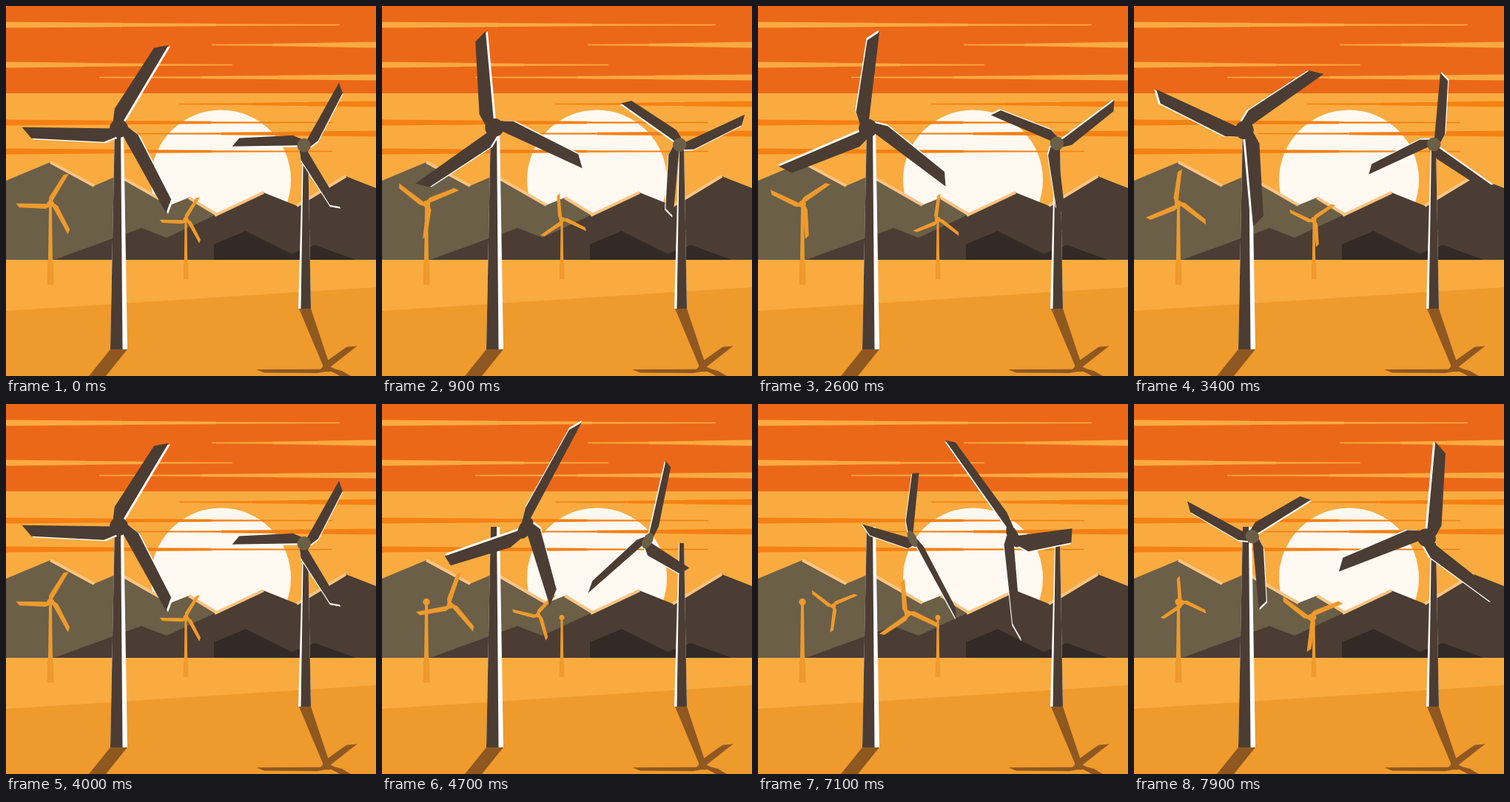
Write an HTML page with a canvas that moves like this. It is 500x500 px and loops after 8 s.

```html
<!DOCTYPE html>
<html>
<head>
<meta charset="utf-8">
<style>
html, body { margin: 0; width: 100%; height: 100%; overflow: hidden; }
canvas { display: block; }
</style>
</head>
<body>
<canvas id="stage" width="500" height="500"></canvas>
<script>
const ctx = document.getElementById('stage').getContext('2d');
const AMBER = '#f9ab40', GOLD = '#ee9a2c', RED = '#ec6819', ORANGE = '#f58013',
  OLIVE = '#6b5f48', DARK = '#4b3d33', BLACK = '#332a25', PALE = '#fcc482',
  SHADE = '#8f5820', WHITE = '#fff';
const RAD = Math.PI / 180, STEP = 100, FRAMES = 80, TAKEOFF = 40, HORIZON = 343;

function poly(color, ...p) {
  ctx.fillStyle = color;
  ctx.beginPath();
  for (let i = 0; i < p.length; i += 2) ctx.lineTo(p[i], p[i + 1]);
  ctx.fill();
}

function disc(color, x, y, r) {
  ctx.fillStyle = color;
  ctx.beginPath();
  ctx.arc(x, y, r, 0, 7);
  ctx.fill();
}

// Upright or leaning post: left and right edge at the top and at the bottom
function post(color, y0, l0, r0, y1, l1, r1) {
  poly(color, l0, y0, r0, y0, r1, y1, l1, y1);
}

// Mountain range down to the horizon; lit 1 brightens falling slopes, -1 rising ones
function range(color, lit, ...p) {
  poly(color, p[0], HORIZON, ...p, p[p.length - 2], HORIZON);
  ctx.strokeStyle = PALE;
  ctx.lineWidth = 4;
  for (let i = 0; i + 3 < p.length; i += 2) {
    if ((p[i + 3] - p[i + 1]) * lit <= 0) continue;
    ctx.beginPath();
    ctx.moveTo(p[i], p[i + 1]);
    ctx.lineTo(p[i + 2], p[i + 3]);
    ctx.stroke();
  }
}

// Cloud streak, thick at x0, narrowing to x1 in three steps
function streak(color, x0, x1, y) {
  const cuts = [0, .35, .63, 1];
  for (let i = 0; i < 3; i++) {
    const a = x0 + (x1 - x0) * cuts[i], b = x0 + (x1 - x0) * cuts[i + 1];
    const h = 4 - 1.4 * i, k = h * .7;
    poly(color, a, y - h, b, y - k, b, y + k, a, y + h);
  }
}

function smallTower(x, y, size) {
  const foot = y + 109 * size, ankle = y + 80 * size;
  post(GOLD, y, x - 1.9 * size, x + 1.9 * size, ankle, x - 3 * size, x + 3 * size);
  post(GOLD, ankle, x - 4 * size, x + 4 * size, foot, x - 4.5 * size, x + 4.5 * size);
  disc(GOLD, x, y, 4.7 * size);
}

function scenery() {
  poly(AMBER, 0, 0, 500, 0, 500, 500, 0, 500);
  post(RED, 0, 0, 500, 118, 0, 500);
  disc('#fff9f2', 290.5, 235, 94.5);
  [451, 278, 306, 126, 234, 441, 168, 441].forEach((end, i) => {
    const fromLeft = end > 300;
    const y = i < 4 ? 25.5 + 27 * i - (i === 3 ? 10 : 0) : [132.5, 157.5, 172.5, 196.5][i - 4];
    streak(i < 4 ? AMBER : ORANGE, fromLeft ? 0 : 500, end, y);
  });

  range(OLIVE, 1, 0, 236, 60, 211, 119, 243, 152, 229, 222, 269, 247, 259, 290, 285);
  range(DARK, 0, 65, HORIZON, 183, 300, 217, 313, 290, 279);
  range(DARK, -1, 282, 283, 348, 252, 393, 270, 459, 230, 500, 246);
  range(BLACK, 0, 281, 322, 324, 304, 386, 335, 417, 323, 473, HORIZON);

  poly(GOLD, 0, 412, 500, 380, 500, 500, 0, 500);
  post(SHADE, 464, 141, 164, 500, 112, 135);
  post(SHADE, 409, 396, 412, 490, 430, 439);
  rotor(groundShadow, 0, 0);

  smallTower(60, 267.5, 1);
  smallTower(243, 288.5, .74);
  post(WHITE, 166, 147, 159, 464, 141, 164);
  post(DARK, 166, 147, 155, 464, 141, 157.5);
  post(WHITE, 188, 401, 408, 409, 395, 412);
  post(DARK, 188, 402, 408, 409, 398.5, 412);
}

function blades(color) {
  for (let i = 0; i < 3; i++) {
    ctx.save();
    ctx.rotate((30.8 + 120 * i) * RAD);
    poly(color, 0, -131, -15, -118, -18.5, -20, -12, -5, 0, -5);
    ctx.restore();
  }
}

function rotor({ from, to = from, size, mirror, turn = 0, spin = 1, color, hub = color, edge, shape }, frame, u) {
  ctx.save();
  ctx.translate(from[0] + (to[0] - from[0]) * u, from[1] + (to[1] - from[1]) * u);
  if (shape) ctx.transform(...shape(u), 0, 0);
  ctx.scale(mirror ? -size : size, size);
  ctx.rotate((36 * spin * frame + turn) * RAD);
  ctx.translate(2, -.5);
  // The lit rim is a pale copy peeking out behind the blades
  if (edge) {
    ctx.translate(2.5, 1.5);
    blades(edge);
    ctx.translate(-2.5, -1.5);
  }
  blades(color);
  disc(hub, 0, 0, 12.5);
  ctx.restore();
}

// Horizontal axis swings half a turn while the vertical one stays upright
const flip = u => [Math.cos(Math.PI * u), -Math.sin(Math.PI * u), 0, 1];

const groundShadow = { from: [433, 491], size: .74, color: SHADE, shape: () => [.99, -.01, .11, .37] };

const rotors = [
  { from: [60, 267.5], to: [243, 288.5], size: .36, spin: -1, color: GOLD },
  { from: [243, 289.5], to: [60, 268], size: .275, color: GOLD },
  { from: [403.7, 187.2], to: [152, 178.5], size: .74, mirror: true, turn: 60,
    color: DARK, hub: OLIVE, edge: WHITE, shape: flip },
  { from: [150.5, 166], to: [403, 183], size: 1, color: DARK, edge: WHITE, shape: flip }
];

function draw(now) {
  const frame = Math.floor(now / STEP) % FRAMES;
  const u = Math.max(0, (frame - TAKEOFF) / (FRAMES - TAKEOFF));
  scenery();
  rotors.forEach(r => rotor(r, frame, u));
}

const start = performance.now();
function tick() {
  draw(performance.now() - start);
  requestAnimationFrame(tick);
}
tick();
</script>
</body>
</html>
```
